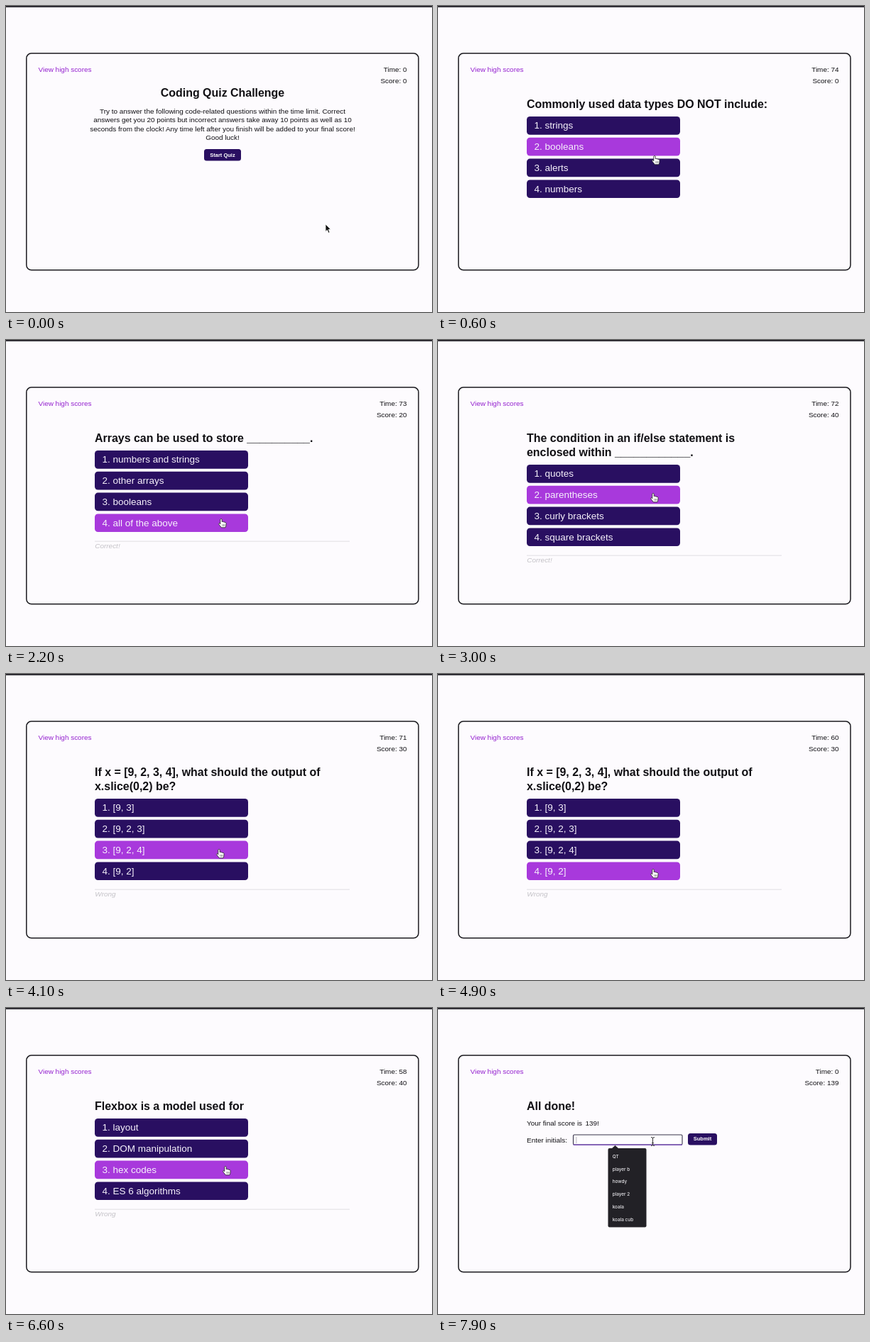
These frames come from a looping animation (600x432 px, 8000 ms). An HTML page:

```html
<!DOCTYPE html>
<html lang="en">
<head>
<meta charset="utf-8">
<title>Coding quiz</title>
<style>
html, body { margin: 0; width: 100%; height: 100%; overflow: hidden; background: #fdfbfe; }
svg { display: block; width: 100%; height: 100%; font: 9.95px "Liberation Sans", Arial, sans-serif; fill: #111014; }
.title { font-size: 15.95px; font-weight: bold; }
.option { font-size: 13.5px; fill: #f6f1fb; }
.small { font-size: 7.5px; font-weight: bold; fill: #fff; }
.note { font-style: italic; fill: #c3c1c6; }
.item { font: 500 6.4px Inter, "Open Sans", sans-serif; fill: #e9e8ec; }
.link { fill: #9420cf; }
</style>
</head>
<body>
<svg id="stage" viewBox="0 0 600 432"></svg>
<script>
const LOOP = 8000, STEP = 100;
const NAVY = '#290f61', PURPLE = '#a839dc', INK = '#222126';
const DONE_AT = 6700, FOCUS_AT = 7600;
const stage = document.getElementById('stage');

const intro = [
  'Try to answer the following code-related questions within the time limit. Correct',
  'answers get you 20 points but incorrect answers take away 10 points as well as 10',
  'seconds from the clock! Any time left after you finish will be added to your final score!',
  'Good luck!'
];

const questions = [
  { at: 600, score: 0, note: '', title: ['Commonly used data types DO NOT include:'],
    options: ['strings', 'booleans', 'alerts', 'numbers'] },
  { at: 1600, score: 20, note: 'Correct!', title: ['Arrays can be used to store __________.'],
    options: ['numbers and strings', 'other arrays', 'booleans', 'all of the above'] },
  { at: 2800, score: 40, note: 'Correct!',
    title: ['The condition in an if/else statement is', 'enclosed within ____________.'],
    options: ['quotes', 'parentheses', 'curly brackets', 'square brackets'] },
  { at: 3900, score: 30, note: 'Wrong',
    title: ['If x = [9, 2, 3, 4], what should the output of', 'x.slice(0,2) be?'],
    options: ['[9, 3]', '[9, 2, 3]', '[9, 2, 4]', '[9, 2]'] },
  { at: 5000, score: 50, note: 'Correct!',
    title: ["Accessing a variable x returns as 'not defined'.", 'The variable could be:'],
    options: ['in scope', 'out of scope', 'in sync', 'out of sync'] },
  { at: 6000, score: 40, note: 'Wrong', title: ['Flexbox is a model used for'],
    options: ['layout', 'DOM manipulation', 'hex codes', 'ES 6 algorithms'] }
];

const saved = ['QT', 'player b', 'howdy', 'player 2', 'koala', 'koala cub'];

// Pointer moves: start, end, target x, target y
const moves = [
  [100, 500, 305, 211], [600, 1000, 302, 233], [1650, 1950, 303, 252],
  [2750, 2980, 303, 216], [3350, 3750, 300, 247], [4350, 4700, 303, 275],
  [5050, 5450, 309, 223], [6800, 7200, 302.5, 188]
];

const ease = p => p * p * (3 - 2 * p);

function pointerAt(t) {
  let x = 450, y = 308;
  for (const [from, to, tx, ty] of moves) {
    const p = ease(Math.min(1, Math.max(0, (t - from) / (to - from))));
    x += (tx - x) * p;
    y += (ty - y) * p;
  }
  return { x, y };
}

function text(x, y, str, cls = '', anchor = 'start') {
  return `<text x="${x}" y="${y}" class="${cls}" text-anchor="${anchor}">${str}</text>`;
}

function rect(x, y, w, h, r, fill, extra = '') {
  return `<rect x="${x}" y="${y}" width="${w}" height="${h}" rx="${r}" fill="${fill}" ${extra}/>`;
}

function inside(p, x, y, w, h) {
  return p.x >= x && p.x <= x + w && p.y >= y && p.y <= y + h;
}

// Draws a button and marks the pointer as a hand when it is over it
function button(p, x, y, w, h, r) {
  const over = inside(p, x, y, w, h);
  if (over) p.kind = 'hand';
  return rect(x, y, w, h, r, over ? PURPLE : NAVY);
}

function startScreen(p) {
  return text(305, 128, 'Coding Quiz Challenge', 'title', 'middle') +
    intro.map((line, i) => text(305, 151.7 + 12.4 * i, line, '', 'middle')).join('') +
    button(p, 279, 202, 52, 16.5, 3.5) +
    text(305, 213, 'Start Quiz', 'small', 'middle');
}

function quizScreen(q, p) {
  const top = 136 + 20 * q.title.length;
  let out = q.title.map((line, i) => text(125, 143.5 + 20 * i, line, 'title')).join('');
  q.options.forEach((option, i) => {
    const y = top + 29.8 * i;
    out += button(p, 125, y, 216, 25.7, 4.5) + text(135.5, y + 17.3, `${i + 1}. ${option}`, 'option');
  });
  if (q.note) {
    out += rect(125, top + 127.7, 359, 0.9, 0, '#dddbe0') + text(125.3, top + 138, q.note, 'note');
  }
  return out;
}

function doneScreen(p, t) {
  const focused = t >= FOCUS_AT;
  if (inside(p, 190, 178, 154, 16)) p.kind = 'beam';
  let out = text(125, 143.5, 'All done!', 'title') +
    text(125, 165.5, 'Your final score is') + text(207.5, 165.5, '139!') +
    text(125, 190.3, 'Enter initials:') +
    rect(190.5, 179, 153.5, 14, 1.5, '#fefdff', `stroke="${focused ? '#39344a' : '#77747c'}" stroke-width="1.1"`) +
    button(p, 352, 177, 41, 16.5, 3.5) + text(372.5, 187.3, 'Submit', 'small', 'middle');
  if (focused) {
    out += rect(190.5, 192.5, 153.5, 1.3, 0.6, '#7b48c4') + rect(194.5, 182, 0.8, 9, 0, '#aaa7b0') +
      `<path d="M244.500 198.500L249.500 194L254.500 198.500Z" fill="${INK}"/>` +
      rect(239.5, 198, 54, 111.5, 2, INK) +
      saved.map((name, i) => text(245.7, 211.6 + 17.9 * i, name, 'item')).join('');
  }
  return out;
}

const shapes = {
  arrow: '<path d="M0 0V10.500L2.400 8.300L4.200 12.400L6 11.600L4.300 7.600H7.500Z" fill="#111" stroke="#fff" stroke-width=".8"/>',
  hand: '<path d="M-1.200 1.200Q0-.6 1.200 1.200V4.600Q2.200 3.800 3.200 4.900Q4.400 4.400 5 5.500Q6.600 5 7 6.500V9Q7 10.500 6 12.800H.2Q-.8 11-2.800 8.800Q-4 7-2.900 6.600Q-2 6.600-1.200 7.800Z" fill="#fff" stroke="#222" stroke-width=".8"/>' +
    '<path d="M1.800 8V11M3.500 8V11M5.100 8V11" stroke="#333" stroke-width=".5"/>',
  beam: '<path d="M-2.500-5.500Q0-5.500 0-4Q0-5.500 2.500-5.500M0-4V5M-2.500 6.500Q0 6.500 0 5Q0 6.500 2.500 6.500M-1.300 2.500H1.300" fill="none" stroke="#333" stroke-width="1"/>'
};

function clock(t) {
  if (t < 600 || t >= DONE_AT) return 0;
  return 74 - Math.floor((t - 600) / 1000) - (t >= 4600 ? 10 : 0);
}

function draw(t) {
  const p = { ...pointerAt(t), kind: 'arrow' };
  const q = questions.filter(item => t >= item.at).pop();
  const done = t >= DONE_AT;
  const screen = done ? doneScreen(p, t) : q ? quizScreen(q, p) : startScreen(p);
  const score = done ? 139 : q ? q.score : 0;
  stage.innerHTML = rect(0, 0, 600, 432, 0, '#fdfbfe') + rect(0, 0, 600, 1.8, 0, '#242228') +
    rect(28.8, 66.8, 552.2, 306, 7, 'none', 'stroke="#1c1b20" stroke-width="1.5"') +
    text(45.5, 93, 'View high scores', 'link') +
    text(564.5, 93, `Time: ${clock(t)}`, '', 'end') +
    text(564.5, 109.2, `Score: ${score}`, '', 'end') +
    screen + `<g transform="translate(${p.x} ${p.y})">${shapes[p.kind]}</g>`;
}

const began = performance.now();
let last = -1;
function tick() {
  const t = Math.floor(((performance.now() - began) % LOOP) / STEP) * STEP;
  if (t !== last) draw(last = t);
  requestAnimationFrame(tick);
}
tick();
</script>
</body>
</html>
```
